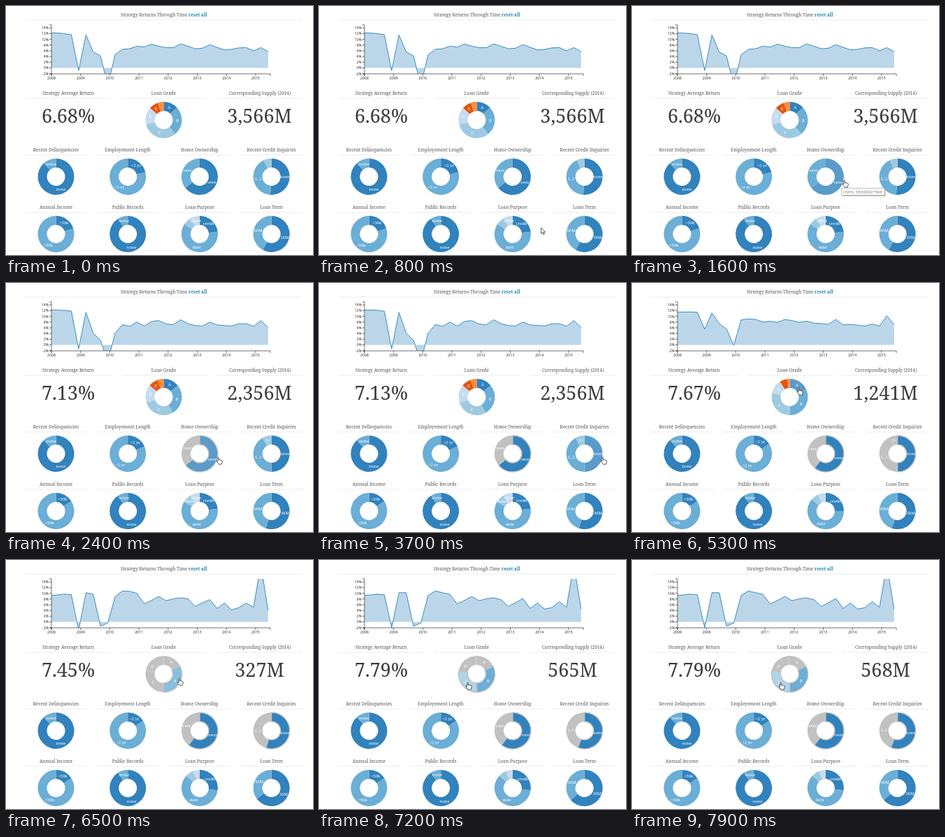
Recreate the animation shown at these times as an HTML page. Size 439x356 px, loop 8000 ms.

```html
<!DOCTYPE html>
<html lang="en">
<head>
<meta charset="utf-8">
<title>Loan strategy dashboard</title>
<style>
html, body { margin: 0; width: 100%; height: 100%; overflow: hidden; background: #fff; }
svg { display: block; width: 100%; height: 100%; }
text { font-family: "Noto Serif", serif; text-anchor: middle; }
.title { font-size: 6.4px; font-weight: 300; fill: #555; }
.reset { font-weight: 700; fill: #2289ad; }
.big { font-size: 27px; font-weight: 300; fill: #3c3c3c; }
.label { font-size: 5.8px; fill: #fff; }
.tick { font: 5.2px "Open Sans", sans-serif; fill: #222; }
.y { text-anchor: end; }
.rule { stroke: #d4d4d4; stroke-width: .7; stroke-dasharray: 1 .6; }
.axis { fill: none; stroke: #333; stroke-width: .7; }
.area { fill: #3182bd; fill-opacity: .33; }
.line { fill: none; stroke: #3c8dc0; stroke-width: 1; stroke-linejoin: round; }
.tip rect { fill: #fff; stroke: #a5a5a5; stroke-width: .7; }
.tip .shade { fill: #bbb; stroke: none; }
.tip text { font: 6.2px "Liberation Sans", Arial, sans-serif; fill: #858585; text-anchor: start; }
.cursor path { fill: #fff; stroke: #222; stroke-width: .75; stroke-linejoin: round; }
</style>
</head>
<body>
<svg id="stage" viewBox="0 0 439 356">
  <defs><clipPath id="plot"><rect x="65" y="27" width="313" height="70"/></clipPath></defs>
</svg>
<script>
const LOOP = 8000, OUTER = 26, INNER = 13, TAU = Math.PI * 2;
const DARK = '#3182bd', MID = '#6baed6', LIGHT = '#9ecae1', PALE = '#c6dbef', GREY = '#c1c1c1';
const stage = document.getElementById('stage');

function add(tag, attrs, parent = stage, text) {
  const el = document.createElementNS('http://www.w3.org/2000/svg', tag);
  for (const k in attrs) el.setAttribute(k, attrs[k]);
  if (text !== undefined) el.textContent = text;
  parent.appendChild(el);
  return el;
}
function heading(cx, y, text, x1, x2) {
  add('line', { class: 'rule', x1, x2, y1: y + 5, y2: y + 5 });
  return add('text', { class: 'title', x: cx, y }, stage, text);
}

// Filter changes: [start, duration]; each one leads to the next state.
const changes = [[1750, 600], [3850, 600], [6300, 180], [6900, 350]];

// Quarterly returns in percent, one row per state
const returns = [
  [12.3, 12.2, 12, 11.6, -.9, 11.5, 5.6, 4.2, -6.3, 4.6, 6.5, 6.7, 7.6, 7.3, 8.3, 7.6,
    7.1, 7.1, 8.4, 7.6, 6.7, 6.9, 8.1, 7.2, 6.3, 6.5, 7, 7.1, 6, 7.1, 5.7],
  [12.2, 12.2, 12.1, 11.8, -1.4, 11.4, 4.1, 1.6, -6, 4.1, 7.1, 6.5, 8, 6.6, 8.2, 8.5,
    7.3, 7.1, 8.8, 7.4, 6.8, 6.6, 8, 7, 6.8, 6.6, 7.4, 7.4, 6.5, 8.5, 6.1],
  [11.4, 11.5, 11.5, 11.4, 5.5, 11.2, 7.4, 5.6, -.2, 8.7, 9.1, 8.9, 8, 8.3, 7.9, 8.9,
    8.5, 7.9, 8.3, 7.6, 7.5, 7.2, 8.9, 7, 7.2, 6.9, 6.6, 7.3, 6.6, 10.2, 7.1],
  [9.3, 9.4, 9.7, 9.5, -3, 10.2, 9.7, -1.5, -.4, 8.8, 10.8, 10.7, 10, 6.3, 7.5, 8.9,
    7.4, 8.1, 8.4, 8.1, 5.4, 6.7, 7.8, 4.7, 6.6, 4.2, 5, 6.6, 5.1, 20, 4]
];
const tweaks = { 4: -2, 6: 10.2, 9: 9.2, 11: 10.2, 12: 9.6, 19: 7.8, 22: 8.2, 25: 4.5, 27: 7.1, 30: 4.5 };
returns.push(returns[3].map((v, i) => tweaks[i] ?? v));

const average = [6.68, 7.13, 7.67, 7.45, 7.79];
const supply = [3566, 2356, 1241, 327, 568];

// Line chart
const px = i => 62.2 + 10.42 * i, py = v => 88.5 - 4.09 * v;
heading(225.7, 15, 'Strategy Returns Through Time ', 27, 424);
add('tspan', { class: 'reset' }, stage.lastChild, 'reset all');
const plot = add('g', { 'clip-path': 'url(#plot)' });
const area = add('path', { class: 'area' }, plot);
const line = add('path', { class: 'line' }, plot);
let axis = 'M62 27H65V97H62M65 100V97H378V100';
for (let v = -2; v <= 14; v += 2) {
  axis += `M62 ${py(v)}H65`;
  add('text', { class: 'tick y', x: 61, y: py(v) + 1.9 }, stage, v + '%');
}
for (let n = 0; n < 8; n++) {
  const x = 65 + 41.7 * n;
  axis += `M${x} 97V100`;
  add('text', { class: 'tick', x, y: 104.8 }, stage, 2008 + n);
}
add('path', { class: 'axis', d: axis });

// Headline numbers
heading(89, 127, 'Strategy Average Return', 27, 151);
heading(225.5, 127, 'Loan Grade', 165, 288);
heading(363, 127, 'Corresponding Supply (2014)', 301, 424);
const avgText = add('text', { class: 'big', x: 89, y: 167 });
const supText = add('text', { class: 'big', x: 362.6, y: 167 });

// Donuts: shares per state in percent, the last slice takes the rest
const pies = [];
function pie(cx, cy, names, colors, shares, chosen = () => '') {
  const g = add('g', { transform: `translate(${cx} ${cy})` });
  const paths = names.map(() => add('path', {}, g));
  const labels = names.map(n => add('text', { class: 'label' }, g, n));
  pies.push({ cx, cy, names, colors, shares, chosen, paths, labels });
}
function cell(col, row, title, ...rest) {
  const cx = 71.5 + 102.7 * col, y = row ? 290 : 208;
  heading(cx, y, title, cx - 44.5, cx + 45);
  pie(cx, y + 36, ...rest);
}
pie(225.5, 163, [...'ABCDEF'], [DARK, MID, LIGHT, PALE, '#e6550d', '#fd8d3c'],
  [[13, 26, 32, 15.5, 8.3], [14, 27.5, 28.5, 16, 8.5], [18, 32, 28.5, 12.5, 7]],
  s => ['', '', '', 'B', 'BC'][s]);
const two = [DARK, MID];
cell(0, 0, 'Recent Delinquencies', ['none', 'some'], two, [[88.3]]);
cell(1, 0, 'Employement Length', ['<2 yr', '>2 yr'], two, [[21], [18.5], [16]]);
cell(2, 0, 'Home Ownership', ['own', 'rent'], two, [[64.5], [64], [60.5]], s => s > 0 ? 'own' : '');
cell(3, 0, 'Recent Credit Inquiries', ['none', '1, 2', '3+'], [DARK, MID, LIGHT],
  [[51, 42], [50, 41.8], [50, 41.8], [55, 40], [56, 40]], s => s > 1 ? 'none' : '');
cell(0, 1, 'Annual Income', ['<50k', '>50k'], two, [[20], [16]]);
cell(1, 1, 'Public Records', ['none', 'some'], two, [[91]]);
cell(2, 1, 'Loan Purpose', ['credit', 'debt', 'home', 'other'], [DARK, MID, LIGHT, PALE],
  [[23, 61.2, 7.4], [23, 60.6, 8.2], [25, 61, 7], [27, 60, 7]]);
cell(3, 1, 'Loan Term', ['36M', '60M'], two, [[58], [55], [55], [65], [63.5]]);

// Tooltip and pointer
const tip = add('g', { class: 'tip' });
add('rect', { class: 'shade', x: 301, y: 262, width: 61.5, height: 10 }, tip);
add('rect', { x: 299.5, y: 260.5, width: 61.5, height: 10 }, tip);
add('text', { x: 301.5, y: 267.8 }, tip, 'OWN: 58300927568');
const cursor = add('g', { class: 'cursor' });
const hand = add('path', { d: 'M.8 1.2Q.8 .2 1.6 .2T2.4 1.2V4L3.6 3.7 5 4.1 6.2 4.4Q7.4 4.7 7.3 5.8L6.9 8 6.2 10.2H2.4L.4 7.4-1 5.7Q-.9 4.8 0 5.2L.8 6Z' }, cursor);
const arrow = add('path', { d: 'M0 0V8.4L2 6.6 3.3 9.6 4.7 9 3.4 6.1H6Z' }, cursor);
const track = [[500, 328, 362], [1150, 302, 249], [2800, 302, 249], [3500, 404, 249], [4600, 404, 249],
  [5200, 237, 150], [5450, 237, 150], [5750, 246, 169], [6500, 246, 169], [6680, 211, 175], [LOOP, 211, 175]];

const ease = k => k < .5 ? 4 * k ** 3 : 1 - 4 * (1 - k) ** 3;
const lerp = (a, b, k) => a + (b - a) * k;
const clamp = k => Math.max(0, Math.min(1, k));
const polar = (a, r) => `${r * Math.sin(a)} ${-r * Math.cos(a)}`;

function slicePath(a, b) {
  const big = b - a > Math.PI ? 1 : 0;
  return `M${polar(a, OUTER)}A${OUTER} ${OUTER} 0 ${big} 1 ${polar(b, OUTER)}` +
    `L${polar(b, INNER)}A${INNER} ${INNER} 0 ${big} 0 ${polar(a, INNER)}Z`;
}
function pointer(t) {
  const n = track.findIndex(p => p[0] > t);
  if (n < 1) return [-50, -50];
  const [t0, x0, y0] = track[n - 1], [t1, x1, y1] = track[n];
  const k = ease((t - t0) / (t1 - t0));
  return [lerp(x0, x1, k), lerp(y0, y1, k)];
}

function drawPie(p, state, mix, [mx, my]) {
  const at = n => p.shares[Math.min(n, p.shares.length - 1)];
  const from = at(Math.max(0, state - 1)), to = at(state);
  const parts = to.map((v, i) => lerp(from[i], v, mix) / 100);
  parts.push(1 - parts.reduce((a, b) => a + b, 0));
  const dx = mx - p.cx, dy = my - p.cy, dist = Math.hypot(dx, dy);
  const over = dist < OUTER && dist > INNER;
  const angle = (Math.atan2(dx, -dy) + TAU) % TAU;
  const chosen = p.chosen(state);
  let a = 0;
  parts.forEach((part, i) => {
    const b = a + part * TAU, mid = (a + b) / 2, r = (OUTER + INNER) / 2;
    const on = chosen.includes(p.names[i]), path = p.paths[i], label = p.labels[i];
    path.setAttribute('d', slicePath(a, b));
    path.setAttribute('fill', chosen && !on ? GREY : p.colors[i]);
    path.setAttribute('fill-opacity', over && angle >= a && angle < b ? .8 : 1);
    path.setAttribute('stroke', chosen && on ? GREY : 'none');
    path.setAttribute('stroke-width', 1.4);
    label.setAttribute('x', r * Math.sin(mid));
    label.setAttribute('y', 1.8 - r * Math.cos(mid));
    label.setAttribute('visibility', part < .08 ? 'hidden' : 'visible');
    a = b;
  });
  return over;
}

function draw(t) {
  const state = changes.filter(c => t >= c[0]).length, prev = Math.max(0, state - 1);
  const mix = state ? ease(clamp((t - changes[prev][0]) / changes[prev][1])) : 1;
  const blend = list => lerp(list[prev], list[state], mix);

  const pts = returns[state].map((v, i) => `${px(i)} ${py(lerp(returns[prev][i], v, mix))}`).join('L');
  line.setAttribute('d', 'M' + pts);
  area.setAttribute('d', `M${px(0)} ${py(0)}L${pts}L${px(30)} ${py(0)}Z`);
  avgText.textContent = blend(average).toFixed(2) + '%';
  supText.textContent = Math.round(blend(supply)).toLocaleString('en-US') + 'M';

  const pos = pointer(t);
  const over = pies.map(p => drawPie(p, state, mix, pos)).some(Boolean);
  cursor.setAttribute('transform', `translate(${pos})`);
  hand.setAttribute('visibility', over ? 'visible' : 'hidden');
  arrow.setAttribute('visibility', over ? 'hidden' : 'visible');
  tip.setAttribute('visibility', t >= 1450 && t < 1750 ? 'visible' : 'hidden');
}

function tick() {
  draw(performance.now() % LOOP);
  requestAnimationFrame(tick);
}
tick();
</script>
</body>
</html>
```
